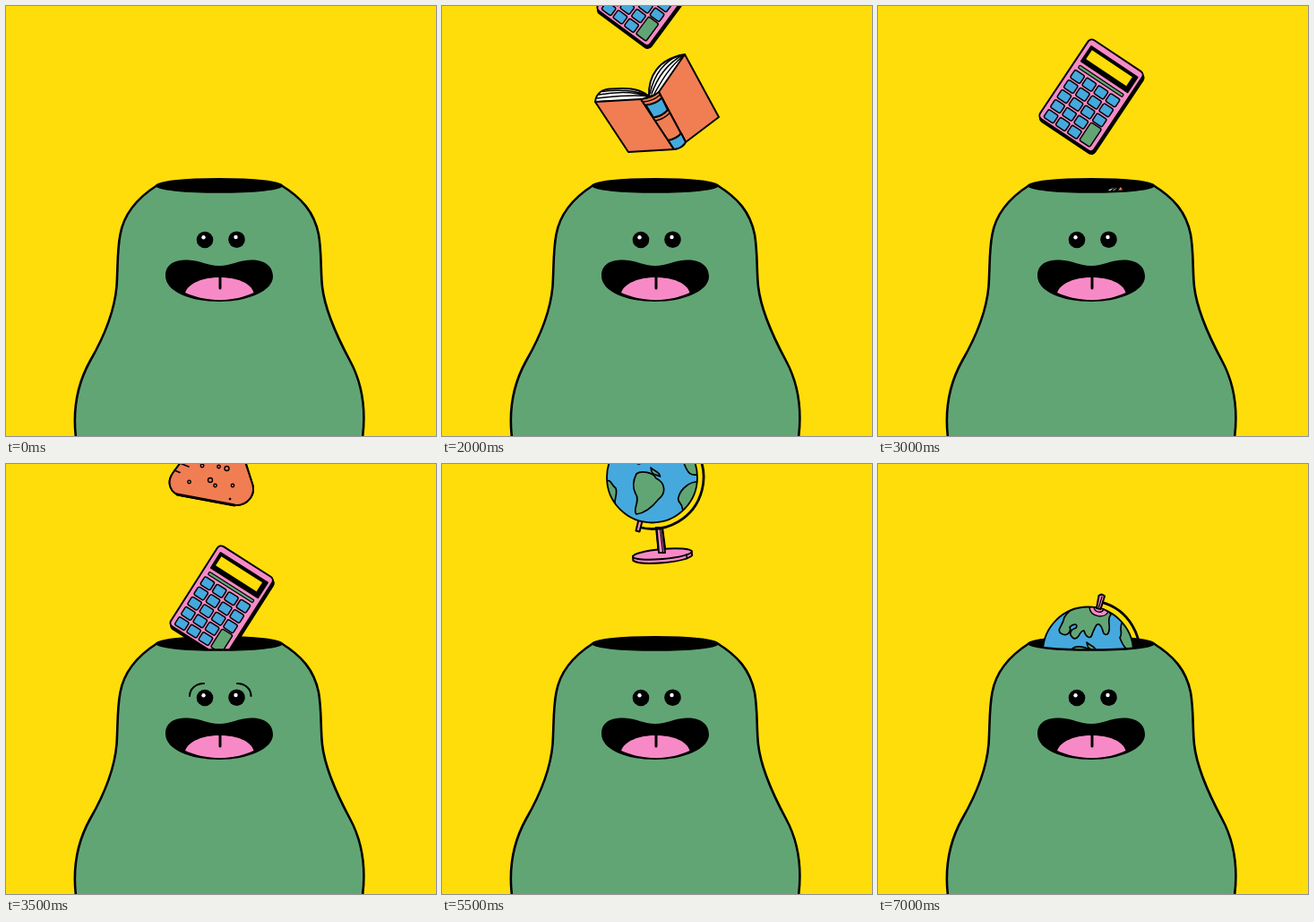
An HTML page that plays this animation: 480 px wide and 480 px high, repeating every 7.5 s.

```html
<!DOCTYPE html>
<html lang="en">
<head>
<meta charset="utf-8">
<title>Hungry mind</title>
<style>
  html, body { margin: 0; width: 100%; height: 100%; overflow: hidden; background: #ffdd0a; }
  svg { display: block; width: 100vw; height: 100vh; }
  .line { fill: none; }
  .y { fill: #ffdd0a; }
  .g { fill: #62a575; }
  .o { fill: #f17d53; }
  .b { fill: #45a9de; }
  .p { fill: #f78ac6; }
  .w { fill: #fff; }
  .k { fill: #000; }
  .flat { stroke: none; }
</style>
</head>
<body>
<svg viewBox="0 0 480 480" stroke="#000" stroke-width="2" stroke-linejoin="round" stroke-linecap="round">
  <defs>
    <clipPath id="opening"><path d="M0 -400H480V200H308A70 8 0 0 1 168 200H0Z"/></clipPath>
    <clipPath id="sphere"><circle cx="234.5" cy="70" r="50.5"/></clipPath>
  </defs>

  <rect class="y flat" width="480" height="480"/>

  <path class="g" stroke-width="2.6" d="M78 482C74 448 80 421 94 396C109 370 121 342 123.5 313C125 290 124 273 127.5 255C132 230 150 212 169 200H307C330 214 344 230 349 255C352.5 275 351 295 353 313C356 340 370 370 384 396C397 420 402 450 398 482Z"/>
  <ellipse class="k flat" cx="238" cy="200" rx="70.5" ry="8"/>

  <g clip-path="url(#opening)">
    <g id="bulb">
      <path class="y" d="M228.5 118C227 104 221.5 100 221.5 87C221.5 69 235 56.5 252.5 56.5C270 56.5 283.5 70 283.5 87C283.5 107 266 108 264 124Z"/>
      <path class="line" d="M268 73C273.5 84 272 97 265.5 105"/>
      <g transform="translate(246 120) rotate(9)">
        <path class="b" d="M-18 -2Q0 3 18 -2L17 17Q16 22 11 23L9 28H-9L-11 23Q-16 22 -17 17Z"/>
        <path class="line" d="M-18 4Q0 8 18 4M-18 10Q0 14 18 10M-17 16Q0 20 17 16M-11 22Q0 25 11 22"/>
        <path class="k" d="M-7 28.5H7L6 31.5H-6Z"/>
      </g>
    </g>

    <g id="book">
      <path class="w" d="M171 181C172 171 180 166 190 166.5C210 164.500 224 168 231 175L222 179Z"/>
      <path class="line" stroke-width="1.5" d="M173 177C192 175 214 172 230 175M175 173C192 170 214 169 230 175M179 169.500C196 167 216 168 230 174"/>
      <path class="w" d="M231 175C230 153 241 133 271 128L242 172Z"/>
      <path class="line" stroke-width="1.5" d="M232 172C236 154 245 137 265 129M234 172C240 155 249 140 268 129M237 172C246 156 254 142 270 129"/>
      <path class="o" d="M171 181L222 178L259 234L208 237Z"/>
      <path class="o" d="M242 170L271 128L309 198L272 226Z"/>
      <path class="o" d="M222 178Q234 177 242 170L272 226Q268 233 259 234Z"/>
      <path class="b" d="M227.500 184.500Q238 184 245.500 176.500L252 190Q246 197 236 198.500Z"/>
      <path class="b" d="M252.500 224Q262 222 267 216L272 226Q268 233 259 234Z"/>
      <path class="line" stroke-width="1.500" d="M225 181Q236 180 243.500 173M238.500 202Q248 200 254 193.500"/>
    </g>

    <g id="calc">
      <rect class="k" x="-35" y="-51.500" width="73" height="106" rx="5"/>
      <rect class="p" x="-37" y="-53.500" width="72.500" height="106" rx="5"/>
      <rect class="k flat" x="-32" y="-47" width="64" height="22" rx="1"/>
      <rect class="y flat" x="-28" y="-43" width="54" height="12"/>
      <rect class="g" stroke-width="1.200" x="-30" y="-21.500" width="59" height="3.500" rx="1"/>
      <g id="keys" stroke-width="1.500"></g>
      <rect class="g" stroke-width="1.500" x="16" y="24.500" width="14" height="24" rx="2"/>
    </g>

    <g id="flask">
      <path class="y" d="M235 24L229 68Q226 80 213 92L187 126C178 138 184 150 195 152L255 163C270 164 279 151 275 139L259 88Q256 80 258 70L266 29Z"/>
      <path class="o" d="M212 92L187 126C178 138 184 150 195 152L255 163C270 164 279 151 275 139L262.500 101Z"/>
      <ellipse class="p" cx="237.500" cy="96" rx="25.500" ry="3.700" transform="rotate(9 237.500 96)"/>
      <path class="line" stroke-width="3.200" d="M191 151L255 163"/>
      <g transform="rotate(8 250.500 26)">
        <ellipse class="y" cx="250.500" cy="26" rx="16" ry="5"/>
        <ellipse class="k flat" cx="250.500" cy="27.500" rx="13.500" ry="3.200"/>
      </g>
      <path class="line" d="M260 39L255 68"/>
      <g id="ticks" stroke-width="1.600"></g>
      <g id="bubbles" class="line" stroke-width="1.400"></g>
      <path class="line" stroke-width="2.600" d="M234 95h.1M250 156h.1"/>
    </g>

    <g id="globe">
      <path class="p" d="M239 126H246L250 156H242Z"/>
      <g transform="rotate(-5 246 157)">
        <path class="p" d="M213 155V160C222 167 270 167 279 160V155Z"/>
        <ellipse class="p" cx="246" cy="155.500" rx="33" ry="5.500"/>
        <path class="line" stroke-width="1.500" d="M273 158V163"/>
      </g>
      <path class="p" d="M239.500 126H245.500L249 154H242Z"/>
      <path class="line" d="M243.500 127L246.500 153" stroke-width="1.200"/>
      <path class="line" stroke-width="2.800" d="M249 14.200A57.500 57.500 0 0 1 220 125.500"/>
      <path class="p" d="M219.500 117H224L220.500 130.500L216.500 129.500Z"/>
      <circle class="b flat" cx="234.500" cy="70" r="50.500"/>
      <g class="g" clip-path="url(#sphere)" stroke-width="1.700">
        <path d="M208 31C206 42 199 44 204 49C212 54 216 46 214 42C218 38 224 38 221 43C212 46 214 52 219 55C226 55 224 46 230 46C232 54 238 56 239 50C242 43 244 36 248 40C252 44 250 52 256 50C262 44 254 34 260 28C250 10 220 12 208 31Z"/>
        <path d="M233 59C238 64 243 63 243.500 69C238 66 234 68 233 59Z"/>
        <path d="M273 36C268 44 274 48 270 54C274 64 276 70 290 66L294 46Z"/>
        <path d="M289 75C276 73 266 84 264 92C262 98 268 98 268 104C270 112 294 95 292 80Z"/>
        <path d="M180 74C190 71 188 78 194 82C196 88 193 92 193 98L180 92Z"/>
        <path d="M217 66C222 62 236 64 239 71C250 76 250 88 242 94C234 104 226 110 217 111C212 106 222 96 216 88C212 80 214 72 217 66Z"/>
      </g>
      <circle class="line" cx="234.500" cy="70" r="50.500" stroke-width="1.800"/>
      <path class="p" stroke-width="1.500" d="M236 20C237 31 253 33 257 25Q247 19 236 20Z"/>
      <path class="p" stroke-width="1.500" d="M241 20C242 26 250 27 252 22Z"/>
      <path class="p" d="M246.500 7Q250 4 253 7.500L248.500 22L244 21Z"/>
      <path class="line" stroke-width="1.200" d="M250 8L246.500 20"/>
    </g>
  </g>

  <path class="line" stroke-width="2.400" d="M168.500 200.500A69.500 7 0 0 0 307.500 200.500"/>

  <g id="open" class="flat">
    <circle cx="222" cy="261" r="9.300"/><circle cx="257.500" cy="260.700" r="9.300"/>
    <circle class="w" cx="220.500" cy="258.200" r="2.200"/><circle class="w" cx="256.500" cy="258" r="2.200"/>
  </g>
  <path id="brows" class="line" d="M205 259C205 251 212 245 221 245M258 245C267 245 273.500 251 273.500 259"/>
  <path id="squint" class="line" stroke-width="2.500" d="M210 253.500C219 254 225 258 230.500 262.500C222 262 215 264 210.500 267M267.500 253.500C259 254 252 258.500 247.500 263C256 262 262 264 267 267"/>

  <path class="k flat" d="M178 301C178 288 189 283 203 283.500C218 284 224 290 238 290C252 290 258 284 273 283.500C288 283 298 290 298 302C298 318 270 330 238 330C206 330 178 319 178 301Z"/>
  <path class="p flat" d="M200 320C204 309 220 303 238 303C258 303 273 309 276.500 320C266 325 253 328 239 328.300C224 328 211 325 200 320Z"/>
  <path class="line" stroke-width="3" d="M239 303V315"/>
</svg>

<script>
  const $ = id => document.getElementById(id);
  const STEP = 500, COUNT = 15;

  // Vertical offsets per step, beginning at the step where each thing appears.
  const drops = {
    bulb:  { start: 1,  dy: [-75, 0, 85] },
    book:  { start: 2,  dy: [-220, -148, -74, 0, 72] },
    calc:  { start: 4,  dy: [-172, -107, -54, 0, 63] },
    flask: { start: 7,  dy: [-117, -60, 0, 85] },
    globe: { start: 10, dy: [-120, -55, 0, 55, 140] }
  };
  const browSteps = [3, 7, 13];
  const squintSteps = [5, 10];

  let keys = '';
  for (let row = 0; row < 5; row++)
    for (let col = 0; col < 4; col++)
      if (col < 3 || row < 3)
        keys += `<rect class="b" x="${-31.5 + col * 15.8}" y="${-14.5 + row * 13.3}" width="13" height="10.500" rx="2"/>`;
  $('keys').innerHTML = keys;

  let ticks = '';
  for (let i = 0; i < 7; i++) {
    const y = 38 + i * 7.5, x = 233 - i * 1.15 - Math.max(0, i - 4) * 1.5;
    ticks += `M${x} ${y}l${i % 2 ? 6 : 10} ${i % 2 ? 1 : 1.8}`;
  }
  for (let i = 0; i < 4; i++)
    ticks += `M${206 - i * 6} ${100 + i * 8}l${i % 2 ? 6 : 10} ${i % 2 ? 2.5 : 4}`;
  $('ticks').innerHTML = `<path class="line" d="${ticks}"/>`;

  $('bubbles').innerHTML = [
    [236, 106, 2.4], [256.5, 106, 1.7], [219, 119, 1.8], [237.5, 120, 1.7], [246.5, 122, 2.5],
    [228, 135, 2.5], [233.5, 141, 1.7], [204.5, 137, 1.7], [253, 141, 1.7]
  ].map(([x, y, r]) => `<circle cx="${x}" cy="${y}" r="${r}"/>`).join('');

  const show = (id, on) => { $(id).style.display = on ? '' : 'none'; };

  function draw(step) {
    for (const [id, { start, dy }] of Object.entries(drops)) {
      const y = dy[step - start];
      show(id, y !== undefined);
      if (y === undefined) continue;
      // The calculator straightens and drifts a little as it falls.
      const place = id === 'calc'
        ? `translate(${241 + y * 0.05} ${154.5 + y}) rotate(${32.5 - y * 0.023})`
        : `translate(0 ${y})`;
      $(id).setAttribute('transform', place);
    }
    const squint = squintSteps.includes(step);
    show('squint', squint);
    show('open', !squint);
    show('brows', browSteps.includes(step));
  }

  let last = -1;
  const begin = performance.now();
  function tick() {
    const step = Math.floor((performance.now() - begin) / STEP) % COUNT;
    if (step !== last) draw(last = step);
    requestAnimationFrame(tick);
  }
  tick();
</script>
</body>
</html>
```
